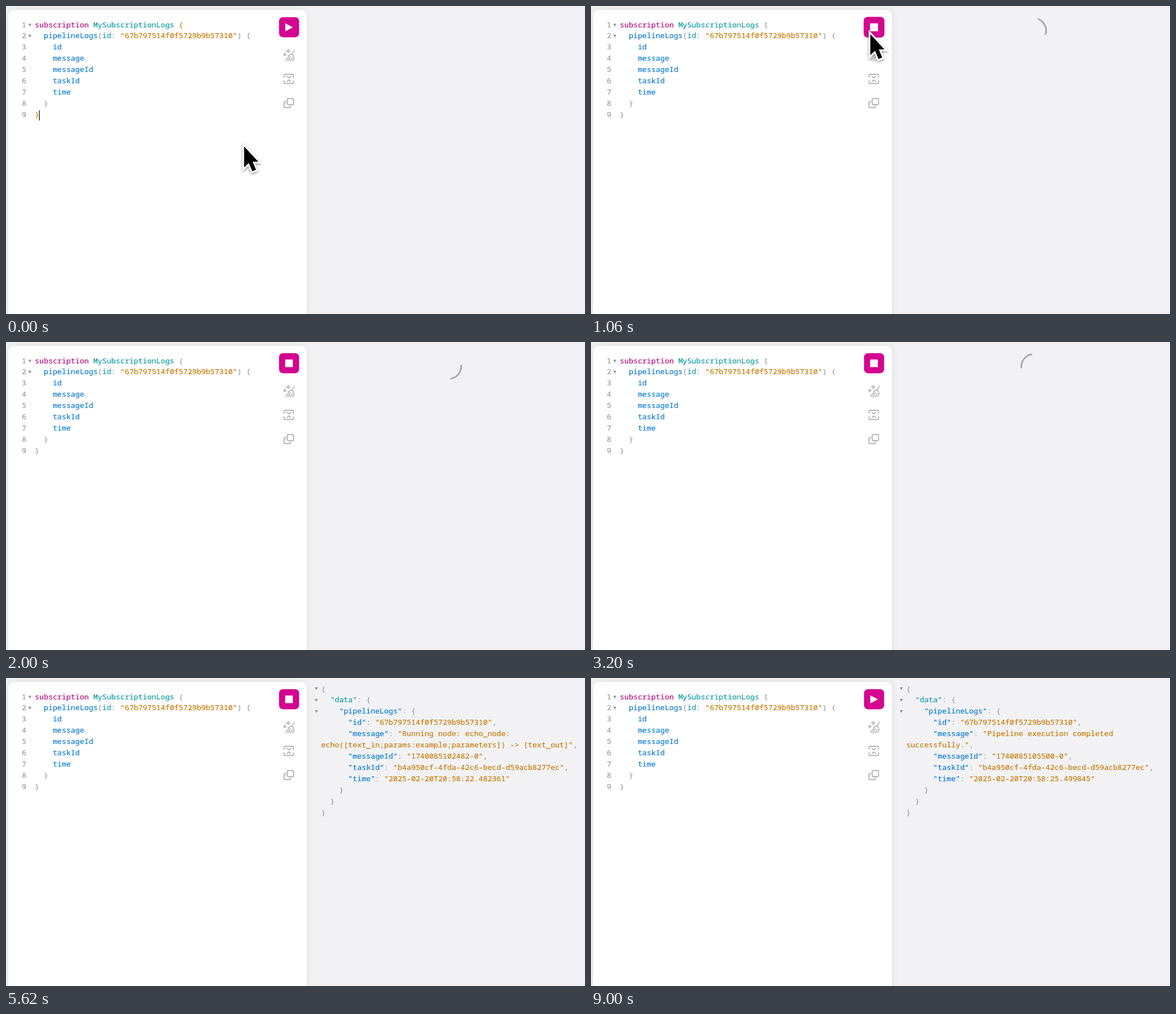
Recreate the animation shown at these times as an HTML page. Size 1026 by 546 pixels, loop 9.02 s.

```html
<!DOCTYPE html>
<html lang="en">
<head>
<meta charset="utf-8">
<title>Subscription log viewer</title>
<style>
  html, body { margin: 0; width: 100%; height: 100%; overflow: hidden; background: #f2f2f4; }
  #panel { position: absolute; left: 4px; top: 7px; bottom: 0; width: 529px; border-radius: 10px 10px 0 0;
    background: #fff; box-shadow: 0 0 14px rgba(60, 70, 90, .1); }
  pre { position: absolute; margin: 0; font: 500 13.29px/19.95px "Fira Code", "Noto Sans Mono", "DejaVu Sans Mono", monospace;
    color: #989ba0; font-variant-ligatures: none; -webkit-text-stroke: .2px; }
  #nums { left: 28px; top: 23.5px; }
  #query { left: 51px; top: 23.5px; }
  #result { left: 558.5px; top: 9.5px; }
  .key { color: #b4107f; }
  .def { color: #159aa9; }
  .prop { color: #0b7ccc; }
  .str, .match { color: #c67a0a; }
  #spinner { position: absolute; left: 761px; top: 19.5px; width: 47px; height: 47px; box-sizing: border-box;
    border: 3.5px solid transparent; border-top-color: #a4a9b4; border-radius: 50%; }
  svg { position: absolute; left: 0; top: 0; width: 100%; height: 100%; }
  .icons { fill: none; stroke: #9fa1a6; stroke-width: 1.5; stroke-linecap: round; stroke-linejoin: round; }
  .fold { fill: #8f9196; }
  #cursor { fill: #000; stroke: #fff; stroke-width: 6; paint-order: stroke;
    filter: drop-shadow(0 2px 2px rgba(0, 0, 0, .4)); }
</style>
</head>
<body>
<div id="panel"></div>
<pre id="nums"></pre>
<pre id="query"><span class="key">subscription</span> <span class="def">MySubscriptionLogs</span> <span class="brace">{</span>
  <span class="prop">pipelineLogs</span>(<span class="def">id</span>: <span class="str">"67b797514f0f5729b9b57310"</span>) {
    <span class="prop">id</span>
    <span class="prop">message</span>
    <span class="prop">messageId</span>
    <span class="prop">taskId</span>
    <span class="prop">time</span>
  }
<span class="brace">}</span></pre>
<pre id="result"></pre>
<div id="spinner"></div>
<svg>
  <path class="fold" d="M39.5 31.5h5.4l-2.7 5zM39.5 51h5.4l-2.7 5z"/>
  <path class="fold" id="folds" d="M547.2 16.5h5.4l-2.7 5zM547.2 37h5.4l-2.7 5zM547.2 57h5.4l-2.7 5z"/>
  <rect id="caret" x="58.3" y="185" width="1.6" height="18" fill="#3d3d3d"/>
  <g id="button">
    <rect x="483.8" y="19.8" width="35.6" height="35.6" rx="7" fill="#d4058f"/>
    <path id="play" d="M495.5 31.5L507.5 37.8 495.5 44.2z" fill="#fff" stroke="#fff" stroke-linejoin="round"/>
    <rect id="stop" x="494.7" y="31" width="13.6" height="13.6" rx="1" fill="#fff"/>
  </g>
  <g class="icons">
    <path stroke-width="1.3" d="M511 78.5L506.5 85M501 88Q505 83 509 87.5 512 92 508 97M501 88Q500 93 495 96.5M504 89Q503 94 499 97.5M507 91Q507 95 503.5 97.5"/>
    <path stroke-width="1.1" d="M500 76.7l1 2.2 2.2 1-2.2 1-1 2.2-1-2.2-2.2-1 2.2-1zM494 83.6l.8 1.7 1.7.8-1.7.8-.8 1.7-.8-1.7-1.7-.8 1.7-.8zM494.5 79.5v.2"/>
    <path d="M492.8 126v-3a2 2 0 0 1 2-2h12.6a2 2 0 0 1 2 2v3M492.8 132.5v3a2 2 0 0 0 2 2h12.6a2 2 0 0 0 2-2v-3M498 124.5l3.2 3 3.2-3M498 134l3.2-3 3.2 3"/>
    <path d="M496 169.3h-1.2a2 2 0 0 0-2 2v7a2 2 0 0 0 2 2h7a2 2 0 0 0 2-2v-1.5"/>
    <rect x="498.3" y="164" width="11.2" height="11" rx="2.3"/>
  </g>
  <path id="cursor" d="M0 0V37L8.3 29.3 14.5 44 21 41.3 15 27H25z"/>
</svg>
<script>
const LOOP = 9020, CLICK = 760, LEAVE = 1100, DONE = 8060, FOLD_DELAY = 620;
const $ = id => document.getElementById(id);
const show = (id, on) => { $(id).style.display = on ? '' : 'none'; };

$('nums').textContent = [1, 2, 3, 4, 5, 6, 7, 8, 9].join('\n');

const logs = [
  [4840, 'Missing LOG_PATH_PREFIX in config. Not\ncapturing session logs.', '1740085102323-0', '22.322642'],
  [5000, 'Running node: echo_node:\necho([text_in;params:example;parameters]) -> [text_out]', '1740085102482-0', '22.482361'],
  [8020, 'Pipeline execution completed\nsuccessfully.', '1740085105500-0', '25.499845']
];

function render([, message, id, seconds]) {
  const json = `{
  "data": {
    "pipelineLogs": {
      "id": "67b797514f0f5729b9b57310",
      "message": "${message}",
      "messageId": "${id}",
      "taskId": "b4a950cf-4fda-42c6-becd-d59acb8277ec",
      "time": "2025-02-20T20:58:${seconds}"
    }
  }
}`;
  return json.replace(/("[^"]*")(:?)/g, (_, s, colon) => {
    const kind = !colon ? 'str' : s === '"data"' ? 'def' : 'prop';
    return `<span class="${kind}">${s}</span>${colon}`;
  });
}
const pages = logs.map(render);

// Eased progress from 0 to 1 between two times
function ease(t, from, to) {
  const p = Math.min(1, Math.max(0, (t - from) / (to - from)));
  return p * p * (3 - 2 * p);
}

let page = -1;
function draw(t) {
  const arrive = ease(t, 0, CLICK), leave = ease(t, LEAVE, 1780);
  const x = 422 + 73 * arrive - 535 * leave;
  const y = 249 - 199 * arrive + 300 * leave;
  $('cursor').setAttribute('transform', `translate(${x} ${y})`);
  show('cursor', t < 1800);

  const hover = x > 484 && x < 520 && y > 20 && y < 56;
  $('button').setAttribute('transform',
    hover ? 'translate(501.6 37.6) scale(1.035) translate(-501.6 -37.6)' : '');

  const focused = t < CLICK, running = !focused && t < DONE;
  show('play', !running);
  show('stop', running);
  show('caret', focused);
  for (const b of document.querySelectorAll('.brace')) b.classList.toggle('match', focused);

  show('spinner', !focused && t < logs[0][0]);
  $('spinner').style.transform = `rotate(${t * .45 - 53}deg)`;

  const current = logs.filter(l => t >= l[0]).length - 1;
  if (current !== page) {
    page = current;
    $('result').innerHTML = pages[page] || '';
  }
  show('folds', page >= 0 && t >= logs[page][0] + FOLD_DELAY);
}

const start = performance.now();
function tick() {
  draw((performance.now() - start) % LOOP);
  requestAnimationFrame(tick);
}
tick();
</script>
</body>
</html>
```
